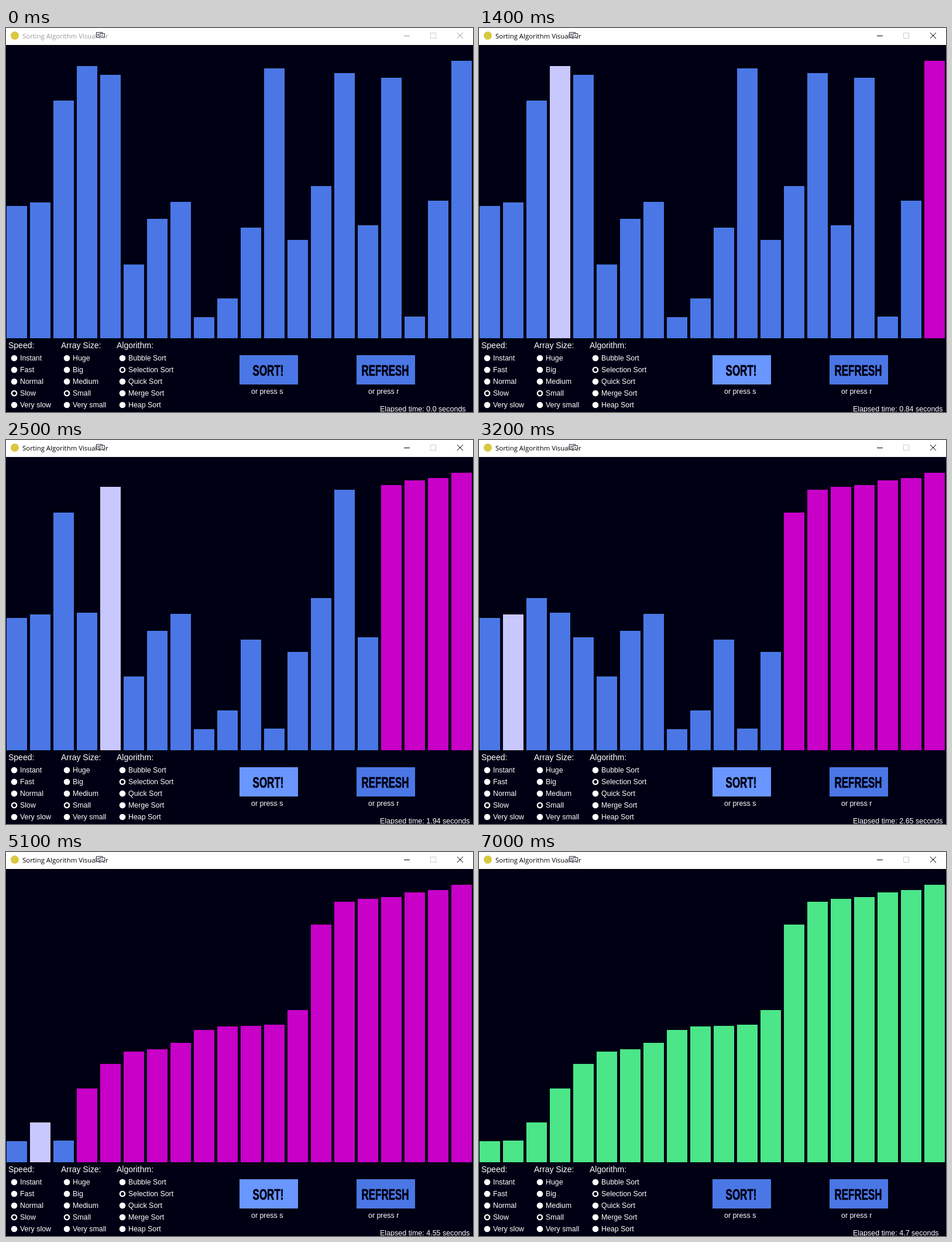
Animation of 798 by 656 pixels, one loop 7.2 s. Source, as an HTML page:

```html
<!DOCTYPE html>
<html lang="en">
<head>
<meta charset="utf-8">
<title>Sorting Algorithm Visualizer</title>
<style>
  html, body { margin: 0; width: 100%; height: 100%; overflow: hidden; background: #000014; }
  svg { display: block; width: 798px; height: 656px; }
  text { font-family: "Liberation Sans", Arial, sans-serif; font-size: 12.4px; fill: #fff; }
  .head { font-size: 14px; }
  .caption { font-family: "Open Sans", "Noto Sans", sans-serif; font-size: 11.4px; fill: #000; }
  .label { font-size: 25px; font-weight: 700; fill: #000014; stroke: #000014; stroke-width: .7; text-anchor: middle; }
  .icon { fill: none; stroke: #000; }
  .idle .caption { fill: #999; }
  .idle .icon { stroke: #999; }
</style>
</head>
<body>
<svg id="stage" viewBox="0 0 798 656">
  <rect width="798" height="656" fill="#000014"/>
  <g id="titlebar">
    <rect width="798" height="29" fill="#fff"/>
    <circle cx="15" cy="13" r="7" fill="#d8c840"/>
    <text class="caption" x="28" y="18">Sorting Algorithm Visualizer</text>
    <g fill="#fff" stroke="#334" shape-rendering="crispEdges">
      <rect x="154.5" y="7.5" width="10" height="8"/>
      <rect x="160.5" y="9.5" width="8" height="6"/>
      <path d="M156 10.5h3M156 12.5h3M163 12.5h3"/>
    </g>
    <path class="icon" d="M680 13.5h10M771 8l10 10M781 8l-10 10"/>
    <rect x="725.5" y="8.5" width="9" height="9" fill="none" stroke="#ccc"/>
  </g>
  <g id="bars" shape-rendering="crispEdges"></g>
  <g id="panel"></g>
  <text id="clock" x="639" y="655" style="font-size:12.5px"></text>
</svg>
<script>
const LOOP = 7200, TICK = 100;
const FOCUS = 500, SORT_START = 548.6, DRAW = 11;
const SWEEP_START = 5540, SWEEP_STEP = 33;
const STEP_SECONDS = 0.0221, TOTAL_SECONDS = 4.7;
const FLOOR = 530;
const BLUE = '#4a77e5', LIGHT = '#6996ff', WHITE = '#c8c8ff',
      RED = '#e6283c', MAGENTA = '#c800c8', GREEN = '#4be688';
const TOPS = [304, 298, 124, 65, 80, 404, 326, 297, 494, 462,
              341, 69, 362, 270, 77, 337, 85, 493, 295, 56];
const COUNT = TOPS.length;

const $ = id => document.getElementById(id);

function add(parent, tag, attrs, text) {
  const el = document.createElementNS('http://www.w3.org/2000/svg', tag);
  for (const key in attrs) el.setAttribute(key, attrs[key]);
  if (text) el.textContent = text;
  return parent.appendChild(el);
}

function radioGroup(x, title, items, chosen) {
  add($('panel'), 'text', { x, y: 547, class: 'head' }, title);
  items.forEach((item, i) => {
    const cy = 564 + 20 * i;
    add($('panel'), 'circle', { cx: x + 10, cy, r: 5.3, fill: '#fff' });
    if (i === chosen) add($('panel'), 'circle', { cx: x + 10, cy, r: 2.9, fill: '#000014' });
    add($('panel'), 'text', { x: x + 20, y: cy + 4 }, item);
  });
}

function button(x, label, hint) {
  const box = add($('panel'), 'rect', { x, y: 559, width: 100, height: 50, fill: BLUE });
  add($('panel'), 'text', { class: 'label', transform: `translate(${x + 49} 594) scale(.68 1)` }, label);
  add($('panel'), 'text', { x: x + 20, y: 625 }, hint);
  return box;
}

radioGroup(4, 'Speed:', ['Instant', 'Fast', 'Normal', 'Slow', 'Very slow'], 3);
radioGroup(94, 'Array Size:', ['Huge', 'Big', 'Medium', 'Small', 'Very small'], 3);
radioGroup(189, 'Algorithm:', ['Bubble Sort', 'Selection Sort', 'Quick Sort', 'Merge Sort', 'Heap Sort'], 1);
const sortButton = button(399, 'SORT!', 'or press s');
button(599, 'REFRESH', 'or press r');
const bars = TOPS.map((_, i) => add($('bars'), 'rect', { x: 1 + 40 * i, width: 35 }));

// Selection sort: two draws per comparison, the first flags a new maximum.
function record() {
  const tops = [...TOPS], draws = [];
  for (let end = COUNT - 1; end > 0; end--) {
    let best = 0;
    const view = [...tops];
    for (let j = 0; j <= end; j++) {
      const hit = tops[j] < tops[best];
      draws.push({ tops: view, end, best, hit: hit ? j : -1 });
      if (hit) best = j;
      draws.push({ tops: view, end, best, hit: -1 });
    }
    [tops[best], tops[end]] = [tops[end], tops[best]];
  }
  return { draws, sorted: tops };
}
const { draws, sorted } = record();

function paint(tops, colour) {
  bars.forEach((bar, i) => {
    bar.setAttribute('y', tops[i]);
    bar.setAttribute('height', FLOOR - tops[i]);
    bar.setAttribute('fill', colour(i));
  });
}

function render(t) {
  const n = Math.floor((t - SORT_START) / DRAW);
  const seconds = Math.min(TOTAL_SECONDS, Math.max(0, Math.floor(n / 2) * STEP_SECONDS));
  const swept = Math.floor((t - SWEEP_START) / SWEEP_STEP);

  if (n < 0) {
    paint(TOPS, () => BLUE);
  } else if (n < draws.length) {
    const d = draws[n];
    paint(d.tops, i => i === d.hit ? RED : i === d.best ? WHITE : i > d.end ? MAGENTA : BLUE);
  } else if (seconds < TOTAL_SECONDS) {
    paint(sorted, () => MAGENTA);
  } else {
    paint(sorted, i => i < swept ? GREEN : i === swept ? MAGENTA : BLUE);
  }

  $('titlebar').classList.toggle('idle', t < FOCUS);
  sortButton.setAttribute('fill', n >= 0 && swept < COUNT ? LIGHT : BLUE);
  const value = String(+seconds.toFixed(2));
  $('clock').textContent = `Elapsed time: ${value.includes('.') ? value : value + '.0'} seconds`;
}

const start = performance.now();
let shown = -1;
function frame() {
  const t = Math.floor((performance.now() - start) % LOOP / TICK) * TICK;
  if (t !== shown) render(shown = t);
  requestAnimationFrame(frame);
}
frame();
</script>
</body>
</html>
```
